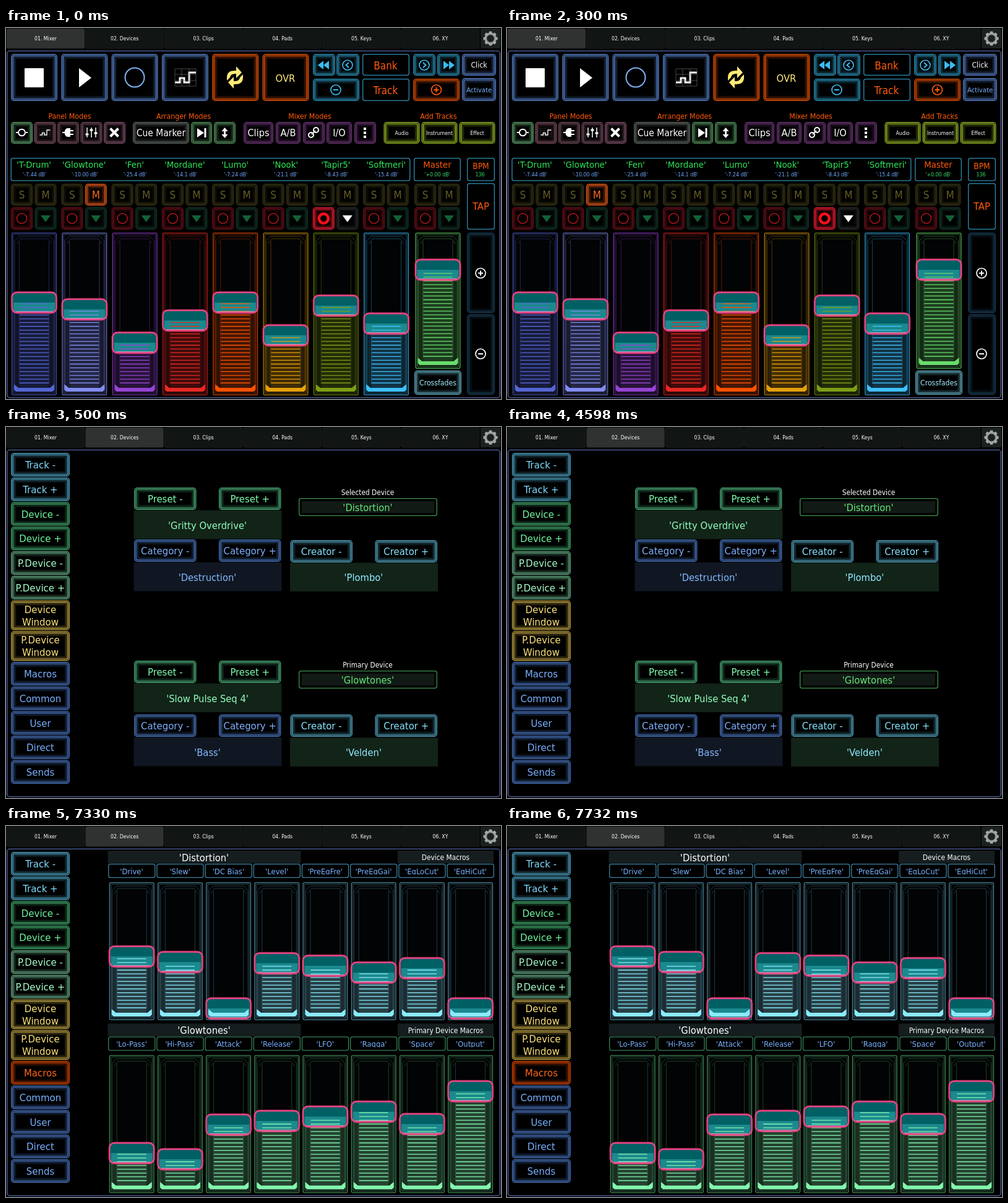
Recreate the animation shown at these times as an HTML page. Size 800 by 600 pixels, loop 8000 ms.

```html
<!DOCTYPE html>
<html lang="en">
<head>
<meta charset="utf-8">
<title>Mixer controller</title>
<style>
html, body { margin: 0; width: 100%; height: 100%; overflow: hidden; background: #000; }
svg { display: block; width: 100vw; height: 100vh; }
text { font-family: "DejaVu Sans Condensed", "Noto Sans", sans-serif; text-anchor: middle; }
</style>
</head>
<body>
<svg id="stage" viewBox="0 0 800 600"></svg>
<script>
const LOOP = 8000;
const TRACK_STEP = 81.3, MACRO_STEP = 78.2, STRIPE_STEP = 6.1;
const CYAN = '#3cbcf0', CYAN_EDGE = '#2f9ac2', CYAN_THIN = '#2f8db0';
const ORANGE = '#ff5a0a', BLUE = '#5c86d2', GREEN = '#2ee65a';

const rect = (x, y, w, h, fill, extra = '') =>
  `<rect x="${x}" y="${y}" width="${w}" height="${h}" fill="${fill}" ${extra}/>`;
const path = (d, color, width = 0) => width
  ? `<path d="${d}" fill="none" stroke="${color}" stroke-width="${width}"/>`
  : `<path d="${d}" fill="${color}"/>`;
const ring = (x, y, r, color, width) =>
  `<circle cx="${x}" cy="${y}" r="${r}" fill="none" stroke="${color}" stroke-width="${width}"/>`;
const at = (x, y, body) => `<g transform="translate(${x} ${y})">${body}</g>`;

// Text is centred vertically on its capitals.
const label = (s, x, y, size, color) =>
  `<text x="${x}" y="${y + size * 0.365}" font-size="${size}" fill="${color}">${s}</text>`;

function outline(x, y, w, h, color, inset, width, opacity, radius) {
  return rect(x + inset, y + inset, w - 2 * inset, h - 2 * inset, 'none',
    `rx="${radius}" stroke="${color}" stroke-width="${width}" stroke-opacity="${opacity}"`);
}

// Double neon frame with a glow that fades inwards.
function neon(x, y, w, h, color) {
  let out = outline(x, y, w, h, color, 1.7, 2.6, 0.28, 3.5);
  out += outline(x, y, w, h, color, 0.7, 1.2, 0.95, 4);
  out += outline(x, y, w, h, color, 3, 1.1, 1, 2.5);
  for (let i = 0; i < 5; i++) out += outline(x, y, w, h, color, 4 + i, 1.2, 0.36 - i * 0.07, 2);
  return out;
}

const thin = (x, y, w, h, color) => outline(x, y, w, h, color, 0.7, 1.3, 1, 3);

function button(x, y, w, h, color, s, size, ink) {
  const lines = s.split('|');
  return neon(x, y, w, h, color) + lines.map((line, i) =>
    label(line, x + w / 2, y + h / 2 + (i - (lines.length - 1) / 2) * 20, size, ink)).join('');
}

function fader(x, top, bottom, thumb, color, frame = color) {
  const h = bottom - top, mid = thumb + 17;
  let out = rect(x + 2, top + 2, 69, h - 4, '#020304');
  out += rect(x + 3, mid, 67, bottom - mid - 4, color, 'opacity=".18"');
  out += rect(x + 13, mid, 47, bottom - mid - 8, color, 'opacity=".1"');
  out += outline(x, top, 73, h, frame, 0.7, 1.3, 0.8, 2);
  out += outline(x, top, 73, h, frame, 3, 0.9, 0.5, 1);
  out += `<g opacity=".34">`
    + path(`M${x + 5} ${top + 20}V${top + 13}L${x + 12} ${top + 6}H${x + 61}L${x + 68} ${top + 13}V${top + 20}`, frame, 1)
    + path(`M${x + 8} ${top + 18}L${x + 14} ${top + 10}H${x + 59}L${x + 65} ${top + 18}`, frame, 1)
    + path(`M${x + 12.5} ${top + 14}V${bottom - 18}M${x + 60.5} ${top + 14}V${bottom - 18}M${x + 5} ${top + 20}V${bottom - 18}M${x + 68} ${top + 20}V${bottom - 18}`, frame, 1)
    + '</g>';
  out += rect(x + 1, thumb, 71, 34, '#006064', 'rx="7"');
  out += rect(x + 3, mid, 67, 14, '#2aa0a4', 'opacity=".65"');
  // The stripes sit on a fixed grid that the fill level uncovers.
  let stripes = '';
  for (let y = bottom - 1.7 - 3 * STRIPE_STEP; y > mid + 1; y -= STRIPE_STEP) stripes += `M${x + 13} ${y.toFixed(1)}h47`;
  out += path(stripes, color, 1.3);
  out += path(`M${x + 4} ${bottom - 18}L${x + 11} ${bottom - 12}H${x + 62}L${x + 69} ${bottom - 18}V${bottom - 9}L${x + 66} ${bottom - 6}H${x + 7}L${x + 4} ${bottom - 9}Z`, color);
  out += rect(x + 6, thumb + 31, 61, 1.2, '#e8c8dc', 'opacity=".8"');
  out += outline(x, thumb, 73, 34, '#ff2d78', 0.5, 4, 0.35, 8);
  return out + outline(x, thumb, 73, 34, '#ff4a8c', 0.5, 1.8, 1, 8);
}

function sign(x, y, color, plus, r = 8) {
  const k = r * 0.5;
  return ring(x, y, r, color, 1.7) +
    path(`M${x - k} ${y}h${2 * k}` + (plus ? `M${x} ${y - k}v${2 * k}` : ''), color, 2);
}

function chrome(active) {
  let out = rect(0, 0, 800, 600, '#000');
  ['Mixer', 'Devices', 'Clips', 'Pads', 'Keys', 'XY'].forEach((s, i) => {
    const x = 1 + i * 127.6;
    out += rect(x, 1, 126, 32, i === active ? '#303231' : '#111513', 'rx="2" stroke="#272b29" stroke-width=".6"');
    out += label(`0${i + 1}. ${s}`, x + 63, 17, 8.6, '#fff');
  });
  out += rect(767, 1, 32, 32, '#1b211e', 'rx="2"');
  for (let i = 0; i < 8; i++)
    out += rect(780.5, 5.5, 5, 5, '#a3a8a8', `rx="1" transform="rotate(${i * 45} 783 17)"`);
  out += ring(783, 17, 8, '#a3a8a8', 3) + ring(783, 17, 6, '#5c6262', 1);
  return out + outline(1, 36.5, 798, 562, '#5468a8', 0.7, 1.3, 1, 4);
}

const stairs = (color) => path('M-17 8H-9V1H-2V8H6V-8H17', color, 3)
  + path('M-17 -14H17V14H-17ZM-17 -5H17M-17 5H17M-6 -14V14M6 -14V14', '#777', 0.6);

function transport() {
  let out = '';
  for (let i = 0; i < 6; i++) out += neon(8 + i * TRACK_STEP, 42, 75, 76, i < 4 ? '#5b88d2' : '#f05808');
  out += rect(30, 65, 31, 31, '#fff', 'rx="1"') + path('M118 65L138 80.5L118 96Z', '#fff');
  out += ring(208, 80, 15.5, '#82b2f2', 2) + at(290, 80, stairs('#fff'));
  const arrow = path('M-13 5V0C-13 -8 -8 -11 0 -11H2V-18L11 -8L2 1V-6C-5 -6 -7 -4 -8 0Z', '#ffe978');
  out += at(370, 80, arrow + `<g transform="rotate(180)">${arrow}</g>`);
  out += label('OVR', 451.5, 81, 16.5, '#ffe978');

  [[496, 36], [534, 37], [658, 36], [697, 36]].forEach(([x, w]) => out += neon(x, 42, w, 35, CYAN_EDGE));
  const skip = path('M0 0L9 -7V7ZM9 0L18 -7V7Z', CYAN);
  out += at(504, 60, skip) + at(725, 60, `<g transform="scale(-1 1)">${skip}</g>`);
  out += ring(552, 60, 8, CYAN, 1.7) + path('M554 56L549.5 60L554 64', CYAN, 2);
  out += ring(676, 60, 8, CYAN, 1.7) + path('M674 56L678.5 60L674 64', CYAN, 2);
  out += neon(496, 82, 75, 36, CYAN_EDGE) + sign(533, 100, CYAN);
  out += neon(658, 82, 75, 36, '#ea5406') + sign(695.5, 100, ORANGE, true);
  out += thin(576, 42, 76, 35, CYAN_THIN) + label('Bank', 613.5, 61, 17, ORANGE);
  out += thin(576, 82, 76, 36, CYAN_THIN) + label('Track', 613.5, 101, 17, ORANGE);
  out += button(737, 42, 55, 35, BLUE, 'Click', 12.2, '#fff');
  return out + button(737, 81, 55, 37, BLUE, 'Activate', 11.2, '#7db4ff');
}

function modes() {
  let out = '';
  [['Panel', 103], ['Arranger', 287], ['Mixer', 491]].forEach(([s, x]) =>
    out += label(s + ' Modes', x, 143, 12.3, ORANGE));
  out += label('Add Tracks', 699, 143, 12.3, ORANGE);
  ['#63a870', '#805264', '#754f5b', '#754e63', '#86546f'].forEach((c, i) =>
    out += neon(8 + i * 37.5, 152, 35, 35, c));
  out += path('M16 169h4c1 -7 10 -7 11 0h4M16 169h4c1 7 10 7 11 0h4', '#fff', 1.8);
  out += at(63, 169, `<g transform="scale(.5)">${stairs('#fff')}</g>`);
  out += path('M91 169h5M109 166h-6M109 172h-6', '#fff', 2) + path('M104 162v14h-5c-6 -2 -6 -12 0 -14Z', '#fff');
  out += path('M131 161v16M138 161v16M145 161v16', '#fff', 1.5)
    + path('M128.5 172h5M135.5 165h5M142.5 170h5', '#fff', 3);
  out += path('M168.5 162.5L181.5 175.5M181.5 162.5L168.5 175.5', '#fff', 4);

  out += button(205, 152, 91, 35, '#656d67', 'Cue Marker', 15.4, '#fff');
  out += neon(299, 152, 34, 35, '#5a9c63') + path('M309 162L320 169.5L309 177Z', '#fff') + path('M322 162v15', '#fff', 3);
  out += neon(336, 152, 35, 35, '#5a9c63') + path('M353.5 161l5 6h-3.5v5h3.5l-5 6l-5 -6h3.5v-5h-3.5Z', '#fff');

  const purple = '#733b7c';
  [[384, 48, 'Clips'], [436, 40, 'A/B'], [480, 35, ''], [518, 41, 'I/O'], [563, 35, '']].forEach(([x, w, s]) =>
    out += button(x, 152, w, 35, purple, s, 16.2, '#fff'));
  out += ring(493, 173, 4, '#fff', 2) + ring(501, 165, 4, '#fff', 2) + path('M494 172L500 166', '#fff', 2);
  out += path('M580 161v4M580 167.5v4M580 174v4', '#fff', 4);
  ['Audio', 'Instrument', 'Effect'].forEach((s, i) =>
    out += button(610.5 + i * 61, 152, 58, 35, '#9abe28', s, 8.7, '#fff'));
  return out;
}

function channel(x, muted, armed) {
  let out = button(x, 252, 35, 35, '#3d3919', 'S', 17, '#665e22');
  out += button(x + 38.5, 252, 35, 35, muted ? '#f5621c' : '#3d3919', 'M', 17, muted ? '#ff6a1c' : '#665e22');
  out += neon(x, 290, 35, 36, armed ? '#ff2038' : '#70131d');
  out += ring(x + 17.5, 308, armed ? 7.5 : 8, armed ? '#ff1018' : '#b8141c', armed ? 4.5 : 1.5);
  out += neon(x + 38.5, 290, 35, 36, armed ? '#2b2f30' : '#163b2d');
  return out + path(`M${x + 48} 303h16l-8 11Z`, armed ? '#fff' : '#126136');
}

function mixer() {
  const tracks = [
    ['T-Drum', '-7.44', 427, '#5566d4'], ['Glowtone', '-10.00', 438, '#828cf0'],
    ['Fen', '-25.4', 492, '#9644d4'], ['Mordane', '-14.1', 456, '#ea2824'],
    ['Lumo', '-7.24', 427, '#ff5200'], ['Nook', '-21.1', 480, '#e5a00c'],
    ['Tapir5', '-8.43', 432, '#7d9e16'], ['Softmeri', '-15.4', 461, '#3fc0ff']];
  let out = chrome(0) + transport() + modes() + thin(7.5, 210, 646, 37.5, CYAN_THIN);
  tracks.forEach(([name, db, thumb, color], i) => {
    const x = 8 + i * TRACK_STEP;
    out += label(`'${name}'`, x + 37, 221, 14.8, GREEN) + label(`'${db} dB'`, x + 38, 237, 8.8, '#6fa8ff');
    out += channel(x, i === 1, i === 6) + fader(x + 1, 331, 594, thumb, color);
  });
  out += thin(659, 210, 76, 37.5, CYAN_THIN) + label('Master', 697, 221, 14.8, ORANGE)
    + label("'+0.00 dB'", 697, 237, 8.8, '#3fdc6a');
  out += channel(660, false, false) + fader(661.5, 331, 551, 374, '#68dc6c');
  out += button(660, 554, 76, 39, '#68b4c8', 'Crossfades', 12.2, '#a4eeff');
  out += thin(745, 210, 45, 37.5, CYAN_THIN) + label('BPM', 767.5, 223, 13.7, ORANGE) + label('136', 766, 237, 8.8, GREEN);
  out += thin(745, 251, 45, 75, CYAN_THIN) + label('TAP', 767.5, 288, 16.5, ORANGE);
  out += neon(745, 331, 45, 130, '#1b4158') + neon(745, 463, 45, 130, '#1b4158');
  return out + sign(767, 396.5, '#fff', true) + sign(767, 527, '#fff');
}

function sidebar(macrosOn) {
  const sky = ['#54aed0', '#7edcff'], leaf = ['#46b272', '#70f7a2'], mint = ['#6cb68e', '#a5ffcb'],
    gold = ['#c8ab48', '#ffe477'], blue = ['#4d7ac8', '#78b0ff'];
  const items = [['Track -', sky], ['Track +', sky], ['Device -', leaf], ['Device +', leaf],
    ['P.Device -', mint], ['P.Device +', mint], ['Device|Window', gold], ['P.Device|Window', gold],
    ['Macros', macrosOn ? ['#e04a04', '#ff6414'] : blue], ['Common', blue], ['User', blue], ['Direct', blue], ['Sends', blue]];
  let y = 42;
  return items.map(([s, [color, ink]]) => {
    const h = s.includes('|') ? 48 : 38;
    const out = button(8, y, 95, h, color, s, 16.7, ink);
    y += h + 1.75;
    return out;
  }).join('');
}

function browser(y, shift, title, device, preset, category, creator) {
  const pair = (x, top, s, color, ink) => ['-', '+'].map((sgn, i) =>
    button(x + i * 137, top, 100.5, 36, color, `${s} ${sgn}`, 16.6, ink)).join('');
  const field = (x, top, s, fill, ink) => rect(x, top, 239, 46.5, fill) + label(s, x + 119, top + 24, 16.4, ink);
  const low = y + 84 + shift, head = y - shift / 3;
  return pair(207, y, 'Preset', '#50b880', '#7dffb0')
    + field(206.5, y + 36.7, `'${preset}'`, '#122318', '#8effbb')
    + pair(207, low, 'Category', '#4f7cca', '#7fb0ff')
    + field(206.5, low + 37, `'${category}'`, '#101722', '#83b9ff')
    + pair(459.5, low + (shift ? 0 : 1), 'Creator', '#58acc8', '#85e4ff')
    + field(459, low + 37.5, `'${creator}'`, '#122318', '#91eaff')
    + label(title, 584.5, head + 8, 11.8, '#fff')
    + thin(473, head + 17, 224, 29, '#3c944b') + rect(478, head + 22, 214, 19, '#121a15')
    + label(`'${device}'`, 584.5, head + 32, 16.4, '#62e878');
}

const devices = () => chrome(1) + sidebar(false)
  + browser(98, 0, 'Selected Device', 'Distortion', 'Gritty Overdrive', 'Destruction', 'Plombo')
  + browser(378, 3, 'Primary Device', 'Glowtones', 'Slow Pulse Seq 4', 'Bass', 'Velden');

function macroRow(y, title, caption, names, thumbs, color, frame, box) {
  let out = rect(164.5, y, 312, 20.5, '#151d1f') + label(title, 320, y + 11, 16.4, '#fff');
  out += rect(633, y, 155, 20.5, '#151d1f') + label(caption, 710.5, y + 11, 11.8, '#fff');
  names.split(' ').forEach((name, i) => {
    const x = 165 + i * MACRO_STEP;
    out += label(`'${name.replace('_', ' ')}'`, x + 38, y + 33, 12.9, '#79b2ff');
    out += rect(x + 2, y + 38.5, 72, 4.5, '#000') + thin(x, y + 21, 76.5, 23, box);
    out += fader(x + 1.7, y + 51, y + 274, thumbs[i], color, frame);
  });
  return out;
}

const macros = () => chrome(1) + sidebar(true)
  + macroRow(40, "'Distortion'", 'Device Macros', 'Drive Slew DC_Bias Level PreEqFre PreEqGai EqLoCut EqHiCut',
    [194, 203, 278, 205, 209, 220, 213, 278], '#8beaff', '#5da6c2', '#3d809e')
  + macroRow(319.5, "'Glowtones'", 'Primary Device Macros', 'Lo-Pass Hi-Pass Attack Release LFO Ragga Space Output',
    [512, 522, 466, 460, 453, 445, 465, 412], '#83f5ad', '#50b070', '#358258');

const stage = document.getElementById('stage');
stage.innerHTML = [mixer, devices, macros].map(scene => `<g>${scene()}</g>`).join('');
const scenes = [...stage.children];

function render(time) {
  const t = time % LOOP;
  const current = t < 500 ? 0 : t < 7330 ? 1 : 2;
  scenes.forEach((g, i) => { g.style.display = i === current ? '' : 'none'; });
}

const start = performance.now();
function tick() {
  render(performance.now() - start);
  requestAnimationFrame(tick);
}
tick();
</script>
</body>
</html>
```
